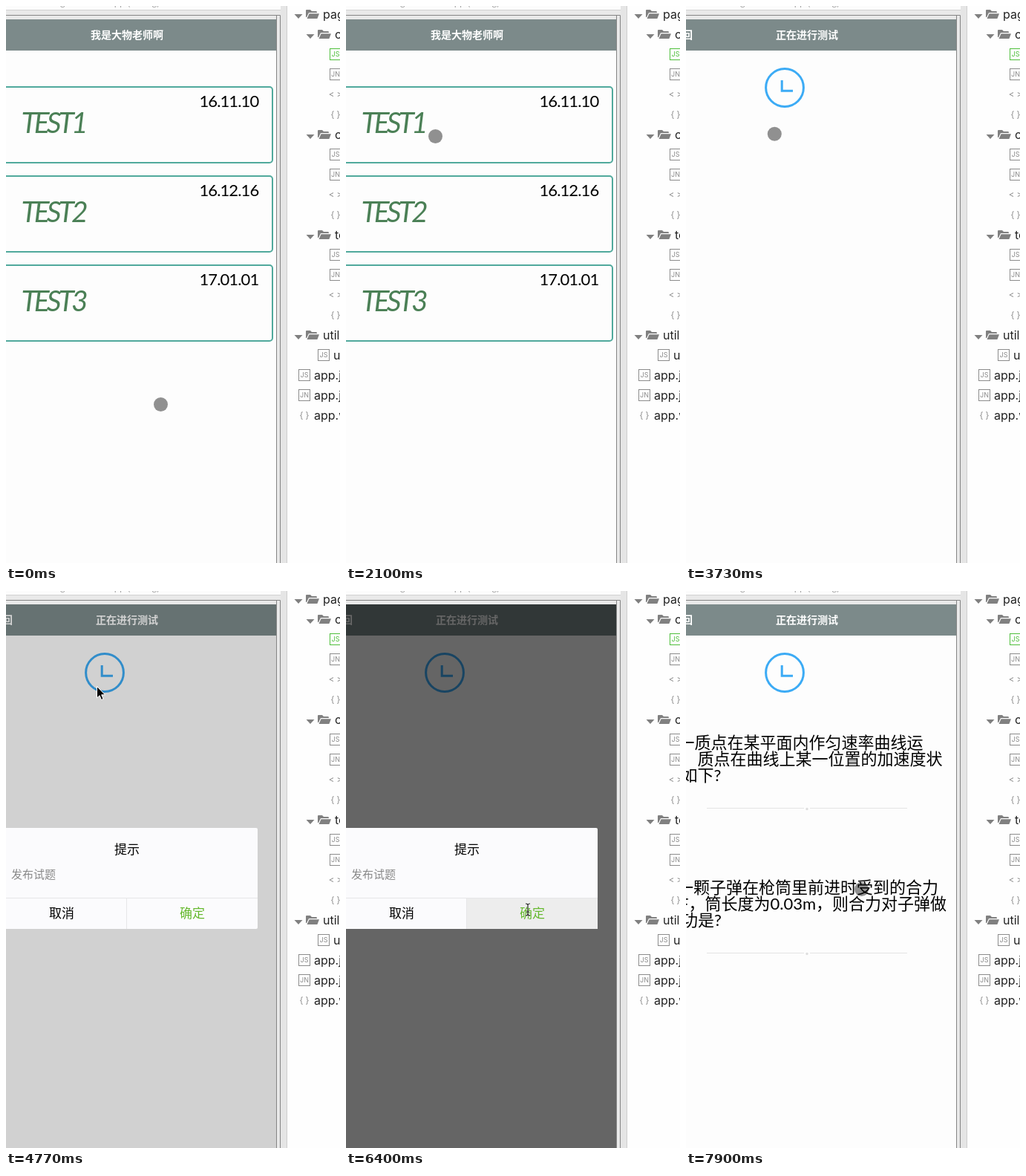
An HTML page for the animation above (8000 ms loop, 450x750 px).

```html
<!DOCTYPE html>
<html lang="zh">
<head>
<meta charset="utf-8">
<style>
  html, body { margin: 0; width: 100%; height: 100%; overflow: hidden; background: #fff; }
  svg { display: block; }
  text { font-family: Lato, "Noto Sans CJK SC", "Noto Sans CJK", sans-serif; white-space: pre; }
  .tree text { font-family: Inter, Roboto, sans-serif; }
  .mid { text-anchor: middle; }
  .name { font-style: italic; letter-spacing: -4px; }
  .date { letter-spacing: -.9px; }
</style>
</head>
<body>
<svg width="450" height="750" viewBox="0 0 450 750">
  <defs>
    <clipPath id="screen"><rect y="18" width="364" height="732"/></clipPath>
    <clipPath id="titlebar"><rect width="368" height="5"/></clipPath>
    <path id="ibeam" d="M-3 -8Q0 -8 0 -6Q0 -8 3 -8M0 -6V6M-3 8Q0 8 0 6Q0 8 3 8M-2 3H2"/>
  </defs>

  <!-- simulator window -->
  <rect width="450" height="750" fill="#e9e9e9"/>
  <rect width="370" height="5" fill="#fcfcfc"/>
  <path d="M0 5.5H370" stroke="#d2d2d2"/>
  <g id="caption" clip-path="url(#titlebar)"></g>
  <path d="M0 12.5H369.5V750M364.5 13V750" fill="none" stroke="#858585"/>
  <rect x="370" width="8" height="750" fill="#e5e5e5"/>
  <path d="M378.5 0V750" stroke="#cfcfcf"/>

  <g clip-path="url(#screen)">
    <rect y="18" width="364" height="732" fill="#fdfdfd"/>
    <g id="list"></g>
    <g id="test">
      <rect x="-38" y="60" width="402" height="690" fill="#fdfdfd"/>
      <g id="clock" fill="none" stroke="#3cabf5" stroke-width="3">
        <circle cx="133" cy="110" r="25.4"/>
        <path d="M129.2 100V114.3H144"/>
      </g>
      <g id="q1"></g>
      <g id="q2"></g>
    </g>
    <rect y="18" width="364" height="42" fill="#7c8a8a"/>
    <g id="listTitle"></g>
    <g id="testTitle"></g>
    <rect id="mask" y="18" width="364" height="732"/>
    <g id="dialog">
      <rect x="-13" y="319" width="352" height="136" rx="2" fill="#fbfbfd"/>
      <rect id="press" x="163" y="413" width="176" height="42" fill="#ededed"/>
      <path d="M0 413.5H339M162.5 413V455" stroke="#e6e6e8"/>
    </g>
  </g>

  <rect x="379" width="71" height="750" fill="#fefefe"/>
  <g id="tree" class="tree"></g>

  <circle id="ball" r="9.5" fill="#000" fill-opacity=".43"/>
  <path id="arrow" d="M-2 -2V13.5L1.6 10.2L4 16L6.6 14.9L4.2 9.3H9Z" fill="#000" stroke="#fff"/>
  <g id="beam" fill="none">
    <use href="#ibeam" stroke="#fff" stroke-width="2.4" stroke-opacity=".6"/>
    <use href="#ibeam" stroke="#222" stroke-width="1.2"/>
  </g>
</svg>

<script>
const $ = id => document.getElementById(id);
const add = (id, markup) => $(id).insertAdjacentHTML('beforeend', markup);
const text = (x, y, size, str, fill = '#000', cls = '', weight = 400) =>
  `<text x="${x}" y="${y}" font-size="${size}" fill="${fill}" class="${cls}" font-weight="${weight}">${str}</text>`;

// Static content
add('caption', text(73, 0, 13, 'gate native app (tuning)', '#a5a5a5'));

['16.11.10', '16.12.16', '17.01.01'].forEach((date, i) => {
  const y = 108 + i * 120;
  add('list', `<rect x="-30" y="${y + 1}" width="389" height="102" rx="4" fill="none" stroke="#50a99c" stroke-width="2"/>` +
    text(20.5, y + 62.5, 39, 'TEST' + (i + 1), '#4b8056', 'name') +
    text(260.5, y + 28, 22, date, '#000', 'date'));
});

const title = (id, str) => add(id, text(163, 43.5, 14, str, '#fff', 'mid', 700));
title('listTitle', '我是大物老师啊');
title('testTitle', '正在进行测试');
add('testTitle', text(-19, 43.5, 14, '返回', '#fff', '', 700));

add('dialog', text(163, 354, 17, '提示', '#000', 'mid') +
  text(7, 386.5, 15, '发布试题', '#888', '', 500) +
  text(75, 440, 17, '取消', '#000', 'mid') +
  text(251, 440, 17, '确定', '#65b92e', 'mid', 500));

// Each line is [x, string]
function question(id, top, lines) {
  const rule = top + 100;
  add(id, lines.map(([x, str], i) => text(x, top + 18.5 + i * 22, 22, str)).join('') +
    `<path d="M28 ${rule - .5}H159M167 ${rule - .5}H298" stroke="#e4e4e4"/>` +
    `<circle cx="163" cy="${rule + .5}" r="1.7" fill="#dedede"/>`);
}
question('q1', 193, [[-10.5, '一质点在某平面内作匀速率曲线运'], [15.5, '质点在曲线上某一位置的加速度状'], [-6.5, '如下?']]);
question('q2', 388, [[-12, '一颗子弹在枪筒里前进时受到的合力'], [-9, 'F，筒长度为0.03m，则合力对子弹做'], [-6, '功是?']]);

// File tree rows: [kind, x, label]
const files = ['JS', 'JN', '&lt; &gt;', '{ }'].map(kind => [kind, 436, '']);
const rows = [
  ['dir', 394, 'pages'],
  ...['c', 'c', 'te'].flatMap(name => [['dir', 410, name], ...files]),
  ['dir', 394, 'utils'], ['JS', 420, 'util'],
  ['JS', 394, 'app.js'], ['JN', 394, 'app.json'], ['{ }', 394, 'app.wx']
];
rows.forEach(([kind, x, label], i) => {
  const y = 11 + i * 27, color = i == 2 ? '#4fbf3c' : '#8c8c8c';
  let icon;
  if (kind == 'dir') {
    icon = `<path d="M${x - 5.5} ${y}h11l-5.5 6z" fill="#808080"/>` +
      `<path transform="translate(${x + 10} ${y - 6})" d="M0 10V1Q0 0 1 0H6L8 2H14Q15 2 15 4H4L1 10ZM4.6 5.2H18L15.4 12H1.5Z" fill="#808080"/>`;
  } else if (kind[0] == 'J') {
    icon = `<rect x="${x + .5}" y="${y - 7.5}" width="15" height="15" fill="none" stroke="${color}"/>` +
      text(x + 8, y + 3.4, 9, kind, color, 'mid');
  } else {
    icon = text(x + 8, y + 3.5, 11.5, kind, color, 'mid');
  }
  add('tree', icon + text(kind == 'dir' ? x + 33 : x + 21, y + 5.5, 16, label, '#222'));
});

// Motion
const LOOP = 8000;
// Progress 0..1 in n jumps, the first at time a and the last at b
const progress = (t, a, b, n) =>
  t < a ? 0 : Math.min(n, Math.floor((t - a) / (b - a) * (n - 1) + .01) + 1) / n;
const ease = p => p * p * (3 - 2 * p);

// Pointer moves, each easing on from where the last one ended
const moves = [
  { from: 150, to: 1050, jumps: 7, x: 158, y: 393, bow: 0 },
  { from: 1200, to: 1800, jumps: 5, x: 120.5, y: 175.5, bow: -12 },
  { from: 3730, to: 4480, jumps: 6, x: 124.5, y: 130.5, bow: -3 },
  { from: 5370, to: 6400, jumps: 8, x: 245, y: 429, bow: 14 },
  { from: 7450, to: 7900, jumps: 4, x: 236.5, y: 401.5, bow: 4 }
];
function pointer(t) {
  let x = 208.5, y = 536.5;
  for (const m of moves) {
    const p = progress(t, m.from, m.to, m.jumps), e = ease(p);
    x += (m.x - x) * e + m.bow * Math.sin(Math.PI * p);
    y += (m.y - y) * e;
  }
  return [x, y];
}

const show = (id, on) => $(id).style.display = on ? '' : 'none';

function draw(t) {
  const slide = progress(t, 2400, 3130, 6);
  const modal = t >= 4770 && t < 6550;
  const [x, y] = pointer(t);

  show('listTitle', !slide);
  show('testTitle', slide);
  show('test', slide);
  $('test').setAttribute('transform', `translate(${402 * (1 - slide) ** 2} 0)`);
  show('clock', t >= 3430);
  show('q1', t >= 6850);
  show('q2', t >= 7150);

  show('mask', modal);
  show('dialog', modal);
  show('press', t >= 6395);
  $('mask').setAttribute('opacity', .6 * ease(progress(t, 4770, 5070, 3)) ** .9);

  const shape = !modal ? 'ball' : y > 413 ? 'beam' : 'arrow';
  for (const id of ['ball', 'beam', 'arrow']) show(id, id == shape);
  $(shape).setAttribute('transform', `translate(${x} ${y})`);
}

const start = performance.now();
function frame() {
  draw((performance.now() - start) % LOOP);
  requestAnimationFrame(frame);
}
frame();
</script>
</body>
</html>
```
